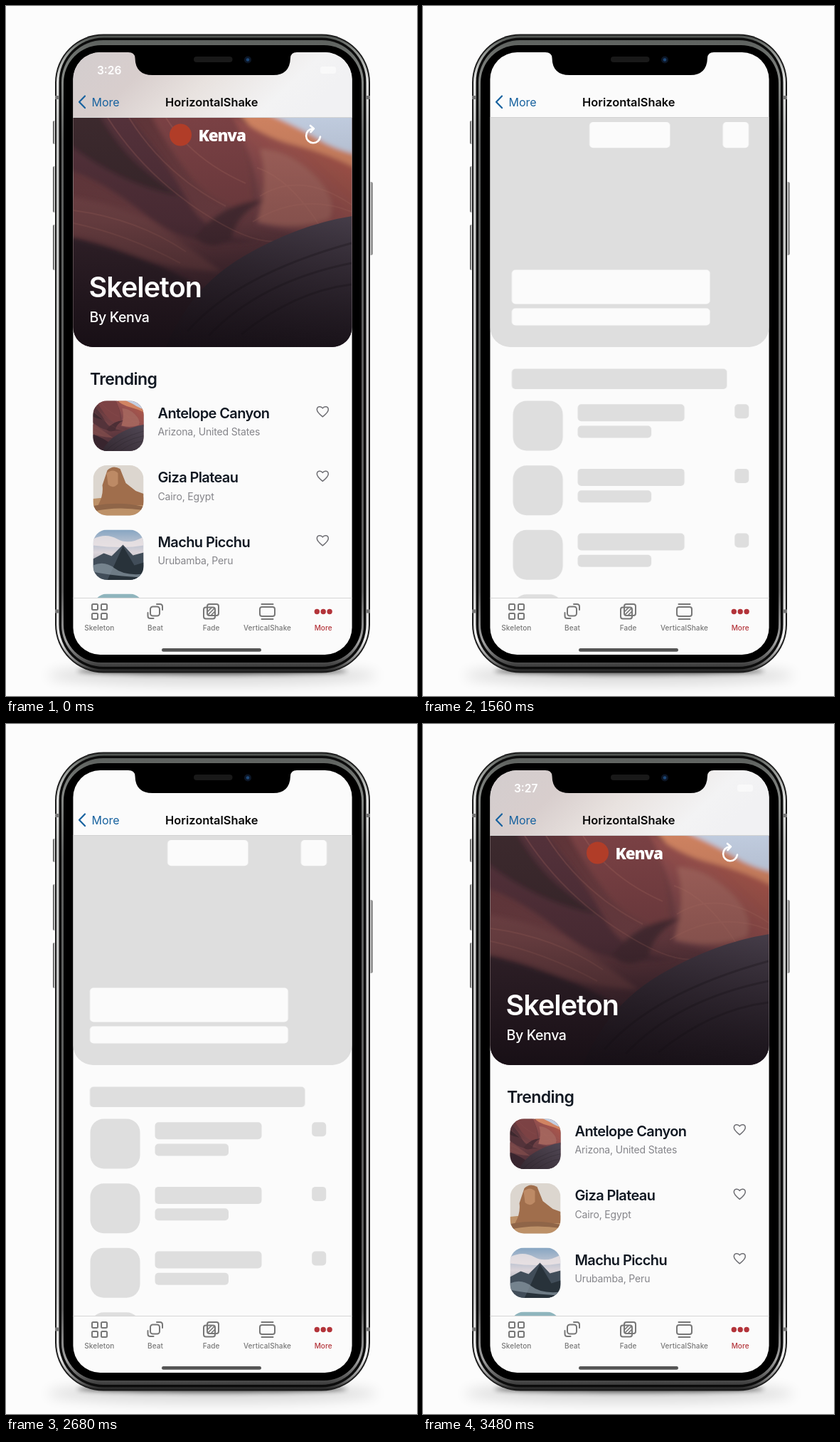
An HTML page for the animation above (6000 ms loop, 578 px wide and 969 px high).

```html
<!DOCTYPE html>
<html lang="en">
<head>
<meta charset="utf-8">
<title>Skeleton loading</title>
<style>
  html, body { margin: 0; width: 100%; height: 100%; overflow: hidden; background: #fcfcfc; }
  svg { display: block; }
  #stage { width: 578px; height: 969px; font-family: Inter, Roboto, sans-serif; }
  .real, .bones, .early, .late { animation: 6s step-end infinite; }
  .real { animation-name: real; }
  .bones { animation-name: bones; }
  .early { animation-name: early; }
  .late { animation-name: late; }
  .head { animation: head 6s linear infinite; }
  .list { animation: list 6s linear infinite; }
  @keyframes real { 0% { visibility: visible } 16.6667% { visibility: hidden } 52%, 100% { visibility: visible } }
  @keyframes bones { 0% { visibility: hidden } 16.6667% { visibility: visible } 52%, 100% { visibility: hidden } }
  @keyframes early { 0% { opacity: 1 } 58%, 100% { opacity: 0 } }
  @keyframes late { 0% { opacity: 0 } 58%, 100% { opacity: 1 } }
  @keyframes head {
    0%, 17.333% { transform: translateX(0) }
    30% { transform: translateX(9.3px) }
    43.667% { transform: translateX(-1.3px) }
    57.333%, 100% { transform: translateX(9.3px) }
  }
  @keyframes list {
    0%, 17.333% { transform: translateX(0) }
    30% { transform: translateX(4.5px) }
    43.667% { transform: translateX(-5.8px) }
    57.333%, 100% { transform: translateX(4.5px) }
  }
  .name { font-size: 20px; font-weight: 600; letter-spacing: -.62px; fill: #111822; }
  .place { font-size: 14px; letter-spacing: -.15px; fill: #85858a; }
  .tab { font-size: 10px; font-weight: 500; letter-spacing: .1px; text-anchor: middle; fill: #777; }
  .icon { fill: none; stroke: #777; stroke-width: 2; stroke-linecap: round; stroke-linejoin: round; }
</style>
</head>
<body>
<svg id="stage" viewBox="0 0 578 969">
  <defs>
    <linearGradient id="metal" x2="0" y2="1">
      <stop offset="0" stop-color="#4c504d"/><stop offset=".02" stop-color="#858985"/>
      <stop offset=".07" stop-color="#e4e5e4"/><stop offset=".14" stop-color="#c6c7c6"/>
      <stop offset=".85" stop-color="#cacaca"/><stop offset=".95" stop-color="#eee"/>
      <stop offset=".985" stop-color="#777"/><stop offset="1" stop-color="#222"/>
    </linearGradient>
    <linearGradient id="rim" x2="0" y2="1">
      <stop offset="0" stop-color="#5d615e"/><stop offset=".06" stop-color="#858885"/>
      <stop offset=".16" stop-color="#5c5e5d"/><stop offset=".88" stop-color="#5a5a5a"/>
      <stop offset=".96" stop-color="#a2a2a2"/><stop offset="1" stop-color="#3a3a3a"/>
    </linearGradient>
    <linearGradient id="button"><stop offset="0" stop-color="#222"/><stop offset=".45" stop-color="#ddd"/><stop offset="1" stop-color="#444"/></linearGradient>
    <linearGradient id="nav" y2=".25">
      <stop offset="0" stop-color="#d3cdce"/><stop offset=".3" stop-color="#d8cecd"/>
      <stop offset=".55" stop-color="#e8e2df"/><stop offset=".85" stop-color="#f3f3f4"/><stop offset="1" stop-color="#f1f1f3"/>
    </linearGradient>
    <linearGradient id="rock" x2=".2" y2="1">
      <stop offset="0" stop-color="#5e3438"/><stop offset=".5" stop-color="#744246"/><stop offset="1" stop-color="#3c2833"/>
    </linearGradient>
    <linearGradient id="wall" x1="1" x2="0" y2="1">
      <stop offset="0" stop-color="#bd5d47"/><stop offset=".5" stop-color="#96504e"/><stop offset="1" stop-color="#633d49"/>
    </linearGradient>
    <linearGradient id="dune" x1="1" x2="0" y2="1"><stop offset="0" stop-color="#514855"/><stop offset="1" stop-color="#2f242c"/></linearGradient>
    <linearGradient id="shade" x2="0" y2="1">
      <stop offset="0" stop-color="#100a10" stop-opacity=".02"/><stop offset=".45" stop-color="#100a10" stop-opacity=".2"/>
      <stop offset="1" stop-color="#100a10" stop-opacity=".8"/>
    </linearGradient>
    <linearGradient id="dawn" x2="0" y2="1"><stop offset="0" stop-color="#86a5c2"/><stop offset=".45" stop-color="#dcd5da"/><stop offset="1" stop-color="#6d7b88"/></linearGradient>
    <filter id="soft" x="-20%" y="-200%" width="140%" height="500%"><feGaussianBlur stdDeviation="9"/></filter>
    <filter id="tight" x="-20%" y="-200%" width="140%" height="500%"><feGaussianBlur stdDeviation="3"/></filter>
    <filter id="haze"><feGaussianBlur stdDeviation="3"/></filter>
    <clipPath id="screen"><rect x="94.400" y="65" width="392.200" height="846" rx="38"/></clipPath>
    <clipPath id="body"><rect x="94" y="157" width="393" height="674"/></clipPath>
    <path id="card" d="M94.400 157H486.600V451a28 28 0 0 1-28 28H122.400a28 28 0 0 1-28-28z"/>
    <clipPath id="cardClip"><use href="#card"/></clipPath>
    <clipPath id="round"><rect width="71" height="70.500" rx="19.500"/></clipPath>
    <path id="heart" d="M0 7.300C-4 4.200-8 1.200-8-2.700C-8-7.600-2-8 0-4.600C2-8 8-7.600 8-2.700C8 1.200 4 4.200 0 7.300Z" fill="none" stroke="#6e6e73" stroke-width="1.500" stroke-linejoin="round"/>

    <g id="canyon">
      <path d="M-1 0H392V322H-1z" fill="url(#rock)"/>
      <g filter="url(#haze)">
        <path d="M228-9H400V75Q370 60 342 62T270 34z" fill="#d18462"/>
        <path d="M266-9H400V52Q366 44 344 30T266-9z" fill="#c3cfe2"/>
        <path d="M220-9Q262 26 310 38T400 72V150Q330 172 256 150Q270 90 220-9z" fill="url(#wall)"/>
        <path d="M262 44Q300 44 336 78T360 142Q312 160 258 146Q276 90 262 44z" fill="#a3645c"/>
        <path d="M-9-9H72Q132 62 160 116T262 172Q170 190 104 138T-9 72z" fill="#54333a"/>
        <path d="M-9-9H34Q64 44 96 70T150 110Q70 96-9 36z" fill="#3e292f"/>
        <path d="M106-9H220Q258 62 250 128Q200 128 164 82T106-9z" fill="#7c4244"/>
        <path d="M-9 110Q82 124 134 162T208 216Q128 212 70 186T-9 166z" fill="#784748"/>
        <path d="M-9 166Q90 190 154 224T246 330H-9z" fill="#38252e"/>
        <path d="M170 168Q212 116 268 116Q228 136 222 170Q194 190 170 168z" fill="#4c2e35"/>
      </g>
      <g fill="none" stroke="#b9786b" stroke-opacity=".22" stroke-width="2">
        <path d="M48 0Q98 78 180 132T300 170M78 0Q128 80 214 124M130 0Q166 58 242 92M0 130Q90 142 158 188M0 148Q76 164 150 204"/>
        <path d="M252 146Q320 104 391 132M262 110Q320 74 391 122M258 70Q306 86 350 158"/>
      </g>
      <path d="M130 322Q164 238 240 194T392 138V322z" fill="url(#dune)"/>
      <path d="M160 300Q230 220 391 176M190 306Q262 230 391 204M236 304Q310 244 391 234" fill="none" stroke="#1d181f" stroke-opacity=".35" stroke-width="3"/>
    </g>
    <g id="boneRow" fill="#dedede">
      <rect x="123.500" y="0" width="70" height="70" rx="19"/>
      <rect x="214.500" y="4.700" width="150" height="24" rx="5"/>
      <rect x="214.500" y="35" width="103.500" height="17" rx="5"/>
      <rect x="435.200" y="4.700" width="20" height="20" rx="5"/>
    </g>
  </defs>

  <rect width="578" height="969" fill="#fcfcfc"/>
  <ellipse cx="290" cy="940" rx="232" ry="14" fill="#000" opacity=".13" filter="url(#soft)"/>
  <ellipse cx="290" cy="934" rx="190" ry="5" fill="#000" opacity=".6" filter="url(#tight)"/>

  <g fill="url(#button)">
    <rect x="66" y="161" width="5" height="33" rx="2"/>
    <rect x="66" y="225" width="5" height="65" rx="2"/>
    <rect x="66" y="307" width="5" height="64" rx="2"/>
    <rect x="510.500" y="247" width="5" height="103" rx="2"/>
  </g>
  <rect x="69" y="39.500" width="443" height="897" rx="68" fill="#1c1c1c"/>
  <rect x="71" y="41.500" width="439" height="893" rx="66" fill="url(#metal)"/>
  <rect x="74.500" y="44.500" width="432" height="887" rx="62.500" fill="#0c0c0c"/>
  <rect x="78" y="48" width="425" height="880" rx="59" fill="url(#rim)"/>
  <rect x="81" y="55" width="419" height="867" rx="53" fill="#000"/>
  <path d="M69 128.500h5M507 128.500h5M69 850h5M507 850h5" stroke="#777" stroke-width="5"/>

  <g clip-path="url(#screen)">
    <rect x="94" y="65" width="393" height="846" fill="#fbfbfb"/>

    <g class="real" clip-path="url(#body)">
      <g clip-path="url(#cardClip)">
        <use href="#canyon" x="95" y="157"/>
        <rect x="94" y="157" width="393" height="322" fill="url(#shade)"/>
      </g>
      <circle cx="245.500" cy="181" r="15.500" fill="#b13d28"/>
      <g fill="#fff">
        <text x="270.500" y="190" font-family="'Open Sans', 'Noto Sans', sans-serif" font-size="22.500" font-weight="800" letter-spacing="-1.200">Kenva</text>
        <text x="116.500" y="409" font-size="39.500" font-weight="600" letter-spacing="-.950">Skeleton</text>
        <text x="117.500" y="444" font-size="19.500" font-weight="500" letter-spacing="-.350">By Kenva</text>
      </g>
      <path d="M442 183.500A10 10 0 1 1 431 172.300M428 168l5 4.200l-4.500 4.800" fill="none" stroke="#fff" stroke-width="2.600" stroke-linecap="round" stroke-linejoin="round"/>
      <text x="118" y="532" font-size="23" font-weight="600" letter-spacing="-.6" fill="#111822">Trending</text>

      <g transform="translate(122.500 554.500)" clip-path="url(#round)">
        <use href="#canyon" transform="translate(-22 0) scale(.24)"/>
      </g>
      <g transform="translate(122.500 645)" clip-path="url(#round)">
        <path d="M0 0H71V71H0z" fill="#dcd6cf"/>
        <path d="M0 47Q36 42 71 45V71H0z" fill="#bd9168"/>
        <path d="M13 28L20 7Q28-1 38 5L46 25L60 36L71 40V56H7Q15 42 13 28z" fill="#a06e4c"/>
        <path d="M19 11Q28 4 35 11V26Q28 34 21 27z" fill="#bd8a65"/>
        <path d="M0 57Q36 50 71 58V63Q32 57 0 65z" fill="#8f6548"/>
      </g>
      <g transform="translate(122.500 735.500)" clip-path="url(#round)">
        <path d="M0 0H71V71H0z" fill="url(#dawn)"/>
        <path d="M0 13Q18 4 34 13T71 10V22Q42 27 0 22z" fill="#f0e6e6" opacity=".8"/>
        <path d="M0 41L15 33L26 37L42 21L56 36L71 32V71H0z" fill="#414d59"/>
        <path d="M20 71L42 23L58 50L71 46V71z" fill="#28323a"/>
        <path d="M0 50Q16 43 30 54T71 62V67Q28 65 0 59z" fill="#8c9aa5" opacity=".7"/>
      </g>
      <g transform="translate(122.500 825.500)" clip-path="url(#round)"><path d="M0 0H71V71H0z" fill="#8fb5bd"/></g>

      <text class="name" x="213.500" y="578.500">Antelope Canyon</text><text class="place" x="213.500" y="603">Arizona, United States</text>
      <text class="name" x="213.500" y="669">Giza Plateau</text><text class="place" x="213.500" y="693.500">Cairo, Egypt</text>
      <text class="name" x="213.500" y="759.500">Machu Picchu</text><text class="place" x="213.500" y="784">Urubamba, Peru</text>
      <use href="#heart" x="445.300" y="569.500"/>
      <use href="#heart" x="445.300" y="660"/>
      <use href="#heart" x="445.300" y="750.500"/>
    </g>

    <g class="bones" clip-path="url(#body)">
      <use href="#card" fill="#dedede"/>
      <g class="head" fill="#fbfbfb">
        <rect x="227.700" y="163" width="113.300" height="36.300" rx="5"/>
        <rect x="415.300" y="163" width="36.300" height="36.300" rx="5"/>
        <rect x="118.500" y="370.500" width="278.700" height="48" rx="5"/>
        <rect x="118.500" y="424.500" width="278.700" height="24" rx="5"/>
        <rect x="118.500" y="509.500" width="302.500" height="28.500" rx="5" fill="#dedede"/>
      </g>
      <g class="list">
        <use href="#boneRow" y="554.500"/>
        <use href="#boneRow" y="645.200"/>
        <use href="#boneRow" y="735.800"/>
        <use href="#boneRow" y="826.300"/>
      </g>
    </g>

    <g class="real">
      <rect x="94" y="65" width="393" height="91.500" fill="url(#nav)"/>
      <g font-size="15.500" font-weight="600" fill="#fff">
        <text class="early" x="128" y="96">3:26</text>
        <text class="late" x="128" y="96">3:27</text>
      </g>
      <rect x="442" y="85" width="22" height="10" rx="3" fill="#fff" opacity=".5"/>
    </g>
    <path d="M94 156.500H487" stroke="#d2d2d2"/>
    <path d="M111 126.500l-8 8.300l8 8.300" fill="none" stroke="#17629f" stroke-width="2.200" stroke-linecap="round" stroke-linejoin="round"/>
    <text x="120.500" y="140.500" font-size="16" fill="#17629f">More</text>
    <text x="289.300" y="140.500" font-size="16.400" font-weight="600" text-anchor="middle" fill="#080808">HorizontalShake</text>

    <path d="M94 831.500H487" stroke="#d6d6d6"/>
    <g class="icon">
      <rect id="cell" x="121" y="840" width="8" height="8" rx="1.500"/>
      <use href="#cell" x="13"/><use href="#cell" y="13"/><use href="#cell" x="13" y="13"/>
      <rect x="203" y="843.500" width="13" height="13" rx="3.500"/>
      <path d="M212 840h4.500q3.500 0 3.500 3.500v4.500M199.500 852v4.500q0 3.500 3.500 3.500h4.500"/>
      <rect x="278" y="844.500" width="16" height="16" rx="3"/>
      <rect x="283" y="840" width="16" height="16" rx="3"/>
      <path d="M284 850l5-5M284 855l9.500-9.500M289 855l5-5" stroke-width="1.700"/>
      <rect x="357" y="844" width="21" height="13" rx="3"/>
      <path d="M359.500 840h16M359.500 861h16"/>
    </g>
    <g fill="#b3343a">
      <circle cx="437.300" cy="850.500" r="3.700"/><circle cx="446.200" cy="850.500" r="3.700"/><circle cx="455.100" cy="850.500" r="3.700"/>
    </g>
    <text class="tab" x="131.300" y="877">Skeleton</text>
    <text class="tab" x="210" y="877">Beat</text>
    <text class="tab" x="288.700" y="877">Fade</text>
    <text class="tab" x="367.500" y="877">VerticalShake</text>
    <text class="tab" x="446.200" y="877" style="fill:#b3343a">More</text>
    <rect x="219" y="902" width="140" height="4.800" rx="2.400" fill="#555"/>
  </g>

  <path d="M172 64V65Q181 65 181.500 73Q182 97 206 97H376Q399 97 400 73Q400.500 65 409 65V64z" fill="#000"/>
  <rect x="264" y="71" width="54.500" height="8" rx="4" fill="#191919"/>
  <circle cx="340" cy="75.500" r="5" fill="#0c1626"/>
  <circle cx="340" cy="75.500" r="2.300" fill="#1d4777"/>
</svg>
</body>
</html>
```
